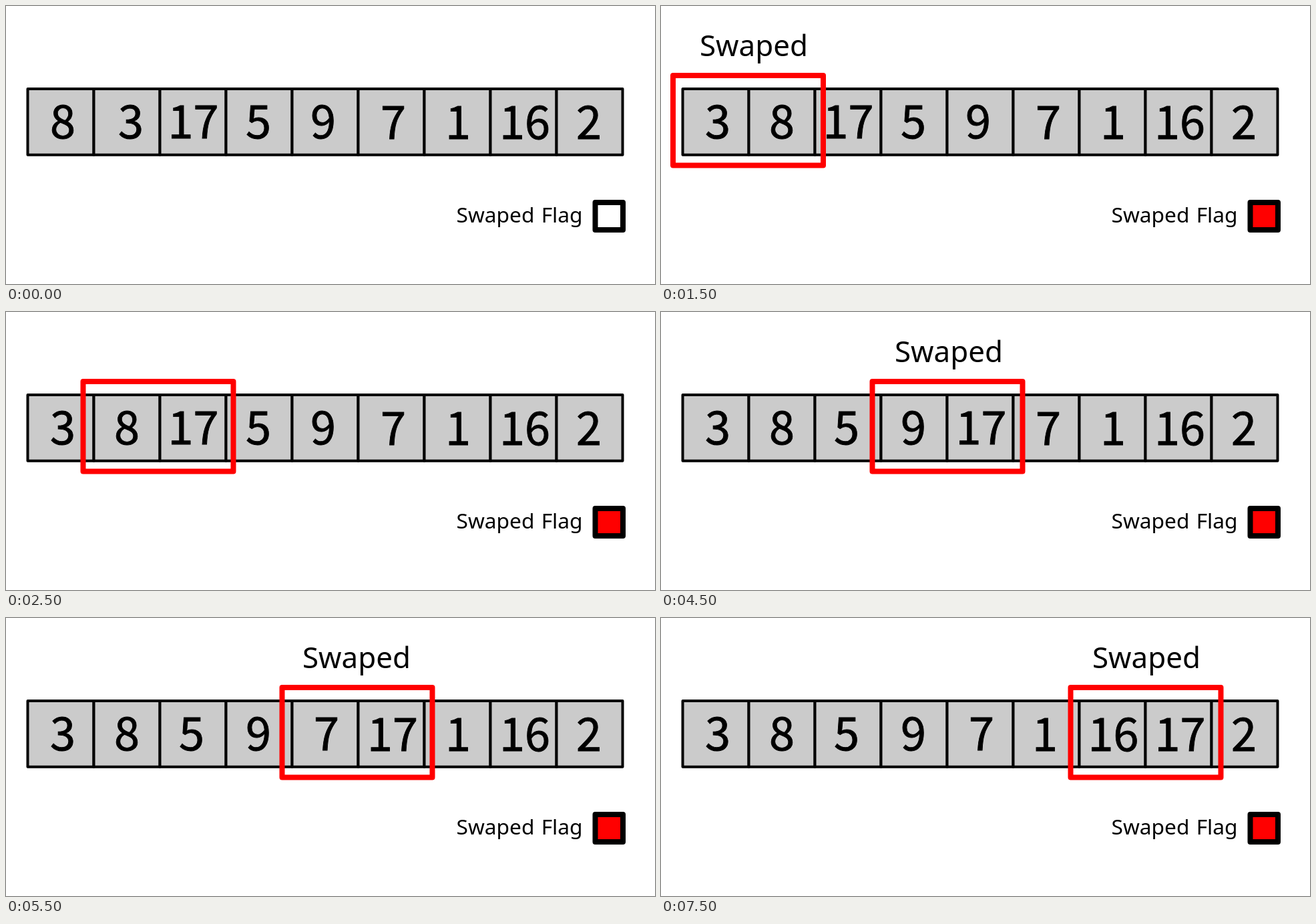
Write an HTML page that moves like this. It is 972 px wide and 416 px high and loops after 8000 ms.

```html
<!DOCTYPE html>
<html lang="en">
<head>
<meta charset="utf-8">
<title>Bubble sort pass</title>
<style>
  html, body { margin: 0; width: 100%; height: 100%; overflow: hidden; background: #fff; }
  svg { display: block; }
  rect { stroke-linejoin: round; }
  .cells { fill: #cbcbcb; stroke: #000; stroke-width: 4; }
  .digits {
    font: 68.5px "Noto Sans CJK JP", "Noto Sans CJK SC", "Noto Sans", sans-serif;
    text-anchor: middle; stroke: #000; stroke-width: .9;
  }
  .words { font-family: "Noto Sans", "Open Sans", sans-serif; }
  #flag { stroke: #000; stroke-width: 8; }
  #frame { fill: none; stroke: #f00; stroke-width: 8; }
</style>
</head>
<body>
<svg width="972" height="416" viewBox="0 0 972 416">
  <g class="cells" id="cells"></g>
  <g class="digits" id="digits"></g>
  <g class="words">
    <text x="674.5" y="324" font-size="31.7" word-spacing="2">Swaped Flag</text>
    <text id="note" y="74.5" font-size="43.9">Swaped</text>
  </g>
  <rect id="flag" x="882.5" y="294" width="41.5" height="41"/>
  <rect id="frame" y="104" width="225" height="134.5"/>
</svg>
<script>
const LOOP = 8000;
const $ = id => document.getElementById(id);

// Centre of each number before the pass
const start = { 8: 85, 3: 187, 17: 280.5, 5: 378, 9: 475, 7: 580, 1: 677, 16: 777, 2: 873 };

// at: ms, box: frame left, note: label left, move: new centres after a swap
const steps = [
  { at: 0 },
  { at: 500, box: 18 },
  { at: 1500, box: 18, note: 58, move: { 3: 85, 8: 181 } },
  { at: 2500, box: 115.5 },
  { at: 3500, box: 216.5, note: 247, move: { 5: 278, 17: 380 } },
  { at: 4500, box: 316.5, note: 350, move: { 9: 378, 17: 479.5 } },
  { at: 5500, box: 413.5, note: 444, move: { 7: 480, 17: 579 } },
  { at: 6500, box: 511, note: 544, move: { 1: 575, 17: 678.5 } },
  { at: 7500, box: 613.5, note: 646, move: { 16: 677.5, 17: 777.5 } }
];

// Carry positions and the flag from step to step
let pos = start, flag = false;
for (const s of steps) {
  pos = s.pos = { ...pos, ...s.move };
  flag = s.flag = flag || !!s.move;
}

function add(parent, tag, attrs = {}) {
  const el = document.createElementNS("http://www.w3.org/2000/svg", tag);
  for (const k in attrs) el.setAttribute(k, attrs[k]);
  return parent.appendChild(el);
}

for (let i = 0; i < 9; i++)
  add($("cells"), "rect", { x: 32.5 + i * 99, y: 124, width: 99, height: 98.7 });

const digits = {};
for (const n in start) {
  digits[n] = add($("digits"), "text");
  digits[n].textContent = n;
}

function place(el, x) {
  el.style.display = x === undefined ? "none" : "";
  if (x !== undefined) el.setAttribute("x", x);
}

function draw(s) {
  for (const n in digits) {
    place(digits[n], s.pos[n]);
    // The right half of the row sits slightly lower
    digits[n].setAttribute("y", s.pos[n] > 540 ? 199 : 197.5);
  }
  place($("frame"), s.box);
  place($("note"), s.note);
  $("flag").setAttribute("fill", s.flag ? "#f00" : "#fff");
}

const t0 = performance.now();
let shown;
function tick() {
  const t = (performance.now() - t0) % LOOP;
  const s = steps.findLast(s => s.at <= t);
  if (s !== shown) draw(shown = s);
  requestAnimationFrame(tick);
}
tick();
</script>
</body>
</html>
```
